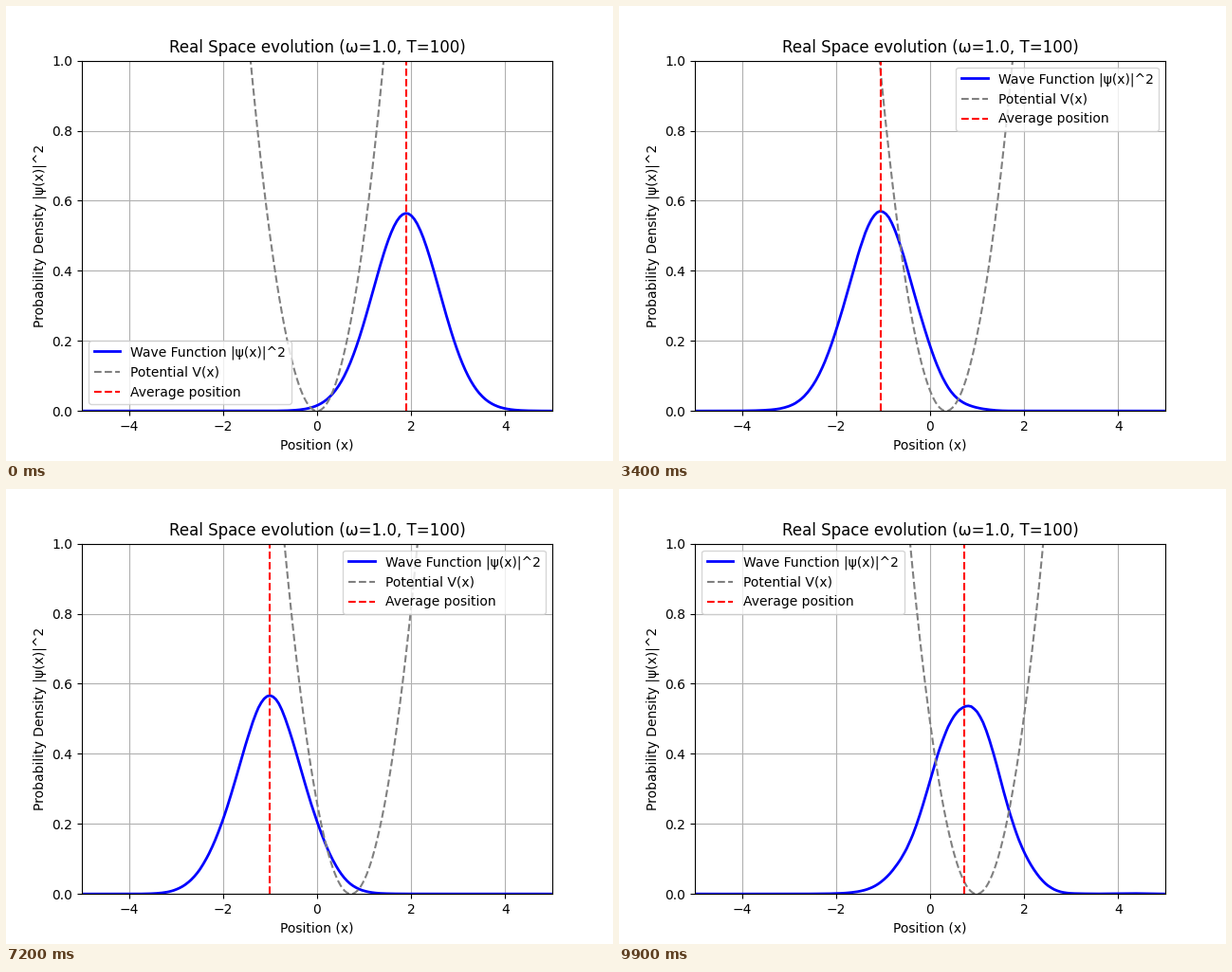
These frames come from a looping animation (640 by 480 pixels, 10000 ms). A matplotlib script:

```python
import numpy as np
import matplotlib.pyplot as plt
from matplotlib.animation import FuncAnimation

OMEGA, T = 1.0, 100
FRAMES, INTERVAL = 100, 100
HALF = 5.0             # box runs from -HALF to HALF, periodic
N, SUBSTEPS = 160, 250
AMP, PHASE = 1.935, -0.205

plt.rcParams["font.family"] = "DejaVu Sans"


def potential(x, t):
    return 0.5 * OMEGA**2 * (x - t / T) ** 2


def evolve():
    """Split-operator evolution; returns |psi|^2 at every whole time unit."""
    dt = 1 / SUBSTEPS
    x = -HALF + 2 * HALF * np.arange(N) / N
    k = 2 * np.pi * np.fft.fftfreq(N, 2 * HALF / N)
    kinetic = np.exp(-0.5j * k**2 * dt)

    q0 = AMP * np.cos(PHASE)
    p0 = -AMP * OMEGA * np.sin(PHASE) + 1 / T
    psi = (OMEGA / np.pi) ** 0.25 * np.exp(-0.5 * OMEGA * (x - q0) ** 2 + 1j * p0 * x)

    densities = [np.abs(psi) ** 2]
    for step in range((FRAMES - 1) * SUBSTEPS):
        half_kick = np.exp(-0.5j * potential(x, (step + 0.5) * dt) * dt)
        psi = half_kick * np.fft.ifft(kinetic * np.fft.fft(half_kick * psi))
        if (step + 1) % SUBSTEPS == 0:
            densities.append(np.abs(psi) ** 2)
    return x, densities


grid, densities = evolve()
means = [np.sum(grid * rho) / np.sum(rho) for rho in densities]
xs = np.linspace(-HALF, HALF, 1000)

fig, ax = plt.subplots(figsize=(6.4, 4.8), dpi=100)
wave, = ax.plot(xs, np.zeros_like(xs), color="blue", lw=2,
                label="Wave Function |ψ(x)|^2")
well, = ax.plot(xs, potential(xs, 0), color="gray", ls="--",
                label="Potential V(x)")
marker = ax.axvline(0, color="red", ls="--", label="Average position")
ax.set(xlim=(-HALF, HALF), ylim=(0, 1),
       xlabel="Position (x)", ylabel="Probability Density |ψ(x)|^2",
       title=f"Real Space evolution (ω={OMEGA}, T={T})")
ax.grid(True)
ax.legend(loc="best")


def update(i):
    wave.set_ydata(np.interp(xs, grid, densities[i], period=2 * HALF))
    well.set_ydata(potential(xs, i))
    marker.set_xdata([means[i]] * 2)
    return wave, well, marker


anim = FuncAnimation(fig, update, frames=FRAMES, interval=INTERVAL,
                     repeat=True, repeat_delay=0)
plt.show()
```
